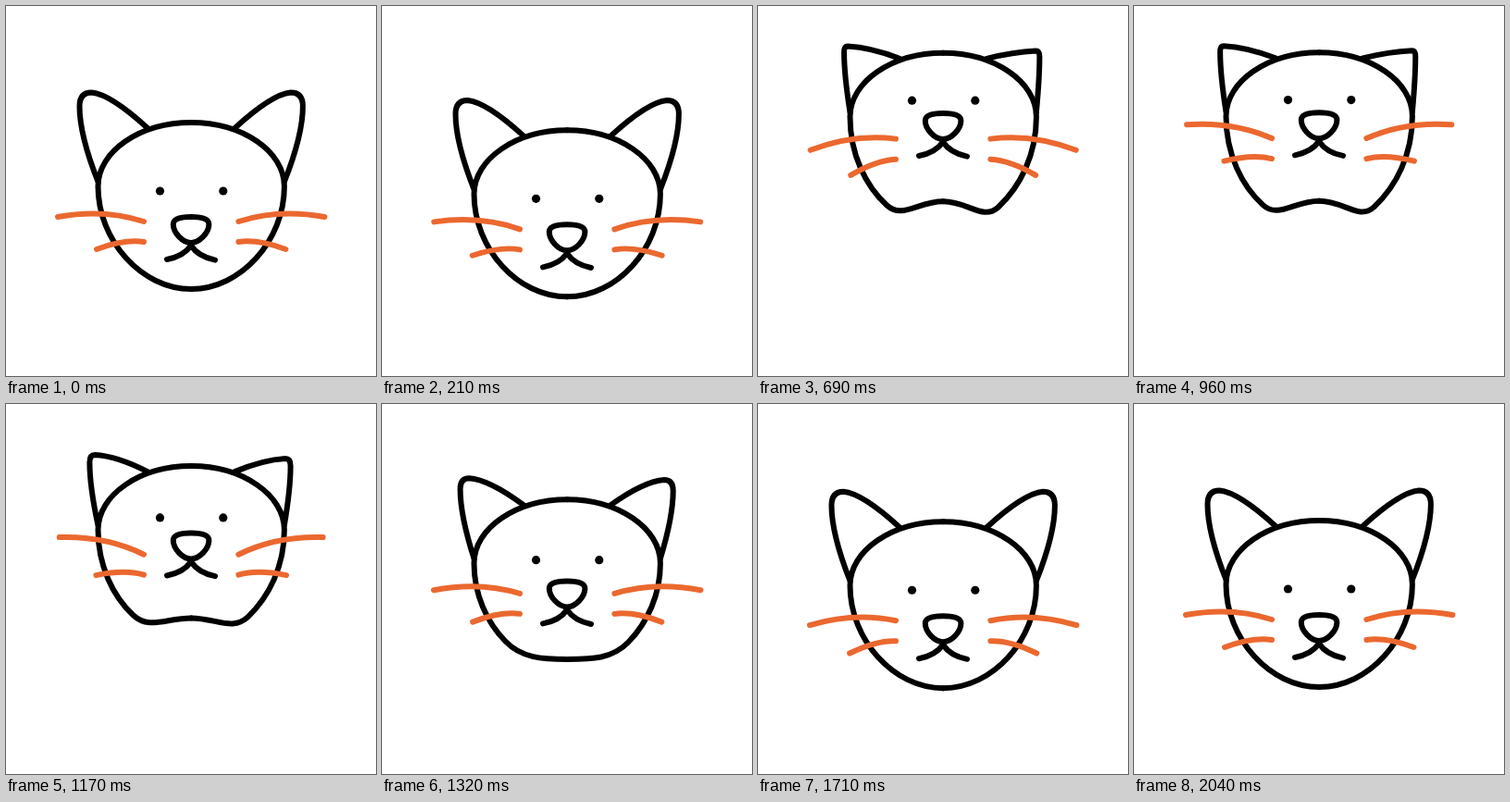
Recreate the animation shown at these times as an HTML page. Size 400 px wide and 400 px high, loop 2340 ms.

```html
<!DOCTYPE html>
<html lang="en">
<head>
<meta charset="utf-8">
<title>Jumping cat</title>
<style>
  html, body { margin: 0; width: 100%; height: 100%; overflow: hidden; background: #fff; }
  svg { display: block; width: 100%; height: 100%; }
  path { fill: none; stroke: #000; stroke-width: 6; stroke-linecap: round; stroke-linejoin: round; }
  .whisker { stroke: #eb682f; }
</style>
</head>
<body>
<svg viewBox="0 0 400 400">
  <g class="side">
    <g class="skull"><path class="ear"/><path class="face"/></g>
    <path class="whisker" d="M149 233Q106 219 56 228"/>
    <path class="whisker" d="M149 255Q128 252 98 263"/>
  </g>
  <g id="eyes"><circle cx="166.5" cy="200" r="4.6"/><circle cx="234.8" cy="200" r="4.6"/></g>
  <g id="muzzle">
    <path d="M200 228C188 228 180.8 230 180.8 236C180.8 245 191 256 200 256C209 256 219.4 245 219.4 236C219.4 230 212 228 200 228Z"/>
    <path d="M174 274Q192 270.5 200 259Q208 271 226 274.6"/>
  </g>
</svg>
<script>
const LOOP = 2340, STEP = 30;
const DIP = 8.4;
const LIFT = { skull: 85, whisker: 99.4, eyes: 108, muzzle: 122.4 };

const sine = x => (1 - Math.cos(Math.PI * x)) / 2;
const cubicIn = x => x ** 3;
const cubicOut = x => 1 - (1 - x) ** 3;
const mix = (a, b, k) => a + (b - a) * k;
const blend = (p, q, k) => [mix(p[0], q[0], k), mix(p[1], q[1], k)];

// Progress from 0 to 1 between two times
const ramp = (t, from, to, ease = sine) =>
  ease(Math.min(1, Math.max(0, (t - from) / (to - from))));

const dipAt = t => DIP * (ramp(t, 0, 220) - ramp(t, 1440, 1800));
const jumpAt = t => ramp(t, 265, 835, cubicOut) - ramp(t, 835, 1400, cubicIn);

// Whisker angle: [time, degrees]
const SWING = [[0, 0], [150, -4.5], [430, 20], [1110, -9.5], [1500, 9], [2040, 0]];
const swingAt = t => SWING.slice(1).reduce((sum, [time, deg], i) =>
  sum + (deg - SWING[i][1]) * ramp(t, SWING[i][0], time), 0);

// Left half of the face: crown, cheek and chin are quarter-ellipse ends
const CROWN = [200.2, 126], CHEEK = [99.5, 195], CHIN = [200.2, 306];
const CURVE = 0.55;
const crownCurve = [
  [mix(CROWN[0], CHEEK[0], CURVE), CROWN[1]],
  [CHEEK[0], mix(CHEEK[1], CROWN[1], CURVE)],
  CHEEK
];

// The round jaw, halved so that its middle can become a corner
const roundJaw = (() => {
  const a = [CHEEK[0], mix(CHEEK[1], CHIN[1], CURVE - 0.02)];
  const b = [mix(CHIN[0], CHEEK[0], CURVE - 0.02), CHIN[1]];
  const ab = blend(a, b, 0.5);
  const p = blend(CHEEK, a, 0.5), q = blend(b, CHIN, 0.5);
  const r = blend(p, ab, 0.5), s = blend(ab, q, 0.5);
  return [p, r, blend(r, s, 0.5), s, q, CHIN];
})();
const airJaw = [[99.5, 236.6], [117, 270.6], [139.5, 291], [156, 306], [173, 286.2], [200.2, 286.2]];

function facePath(jump, lean) {
  const jaw = roundJaw.map((p, i) => {
    const [x, y] = blend(p, airJaw[i], jump);
    const corner = i === 2 || i === 3;
    return corner ? [x + 1.3 * lean, y + 2 * lean] : [x, y];
  });
  return `M${CROWN}C${crownCurve}C${jaw.slice(0, 3)}C${jaw.slice(3)}`;
}

function earPath(jump, lean) {
  const at = (rest, air) => {
    const [x, y] = blend(rest, air, jump);
    return [x + 3 * lean, y + 5 * lean];
  };
  const base = [99.5, 190], inner = [153, 132];
  const side = at([79.5, 108.5], [93.3, 125.6]);
  const tip = at([92.5, 93.6], [97, 119.2]);
  const bend = at([113, 95.5], [122, 120.4]);
  const under = [side[0], mix(base[1], side[1], 0.62)];
  return `M${base}Q${under} ${side}Q${[side[0], tip[1]]} ${tip}Q${bend} ${inner}`;
}

// The right side mirrors the left and leans a little in the air
const left = document.querySelector(".side");
const right = left.cloneNode(true);
right.setAttribute("transform", "translate(400.4 0) scale(-1 1)");
left.after(right);

const place = (el, y, more = "") => el.setAttribute("transform", `translate(0 ${y}) ${more}`);

function draw(t) {
  const dip = dipAt(t), jump = jumpAt(t), swing = swingAt(t);
  const height = part => dip - LIFT[part] * jump;

  [left, right].forEach((side, i) => {
    const lean = i * jump;
    side.querySelector(".face").setAttribute("d", facePath(jump, lean));
    side.querySelector(".ear").setAttribute("d", earPath(jump, lean));
    place(side.querySelector(".skull"), height("skull"));
    side.querySelectorAll(".whisker").forEach((w, n) =>
      place(w, height("whisker"), `rotate(${-swing} 149 ${233 + 22 * n})`));
  });
  for (const id of ["eyes", "muzzle"]) place(document.getElementById(id), height(id));
}

const start = performance.now();
function tick() {
  const t = (performance.now() - start) % LOOP;
  draw(Math.floor(t / STEP) * STEP);
  requestAnimationFrame(tick);
}
draw(0);
requestAnimationFrame(tick);
</script>
</body>
</html>
```
